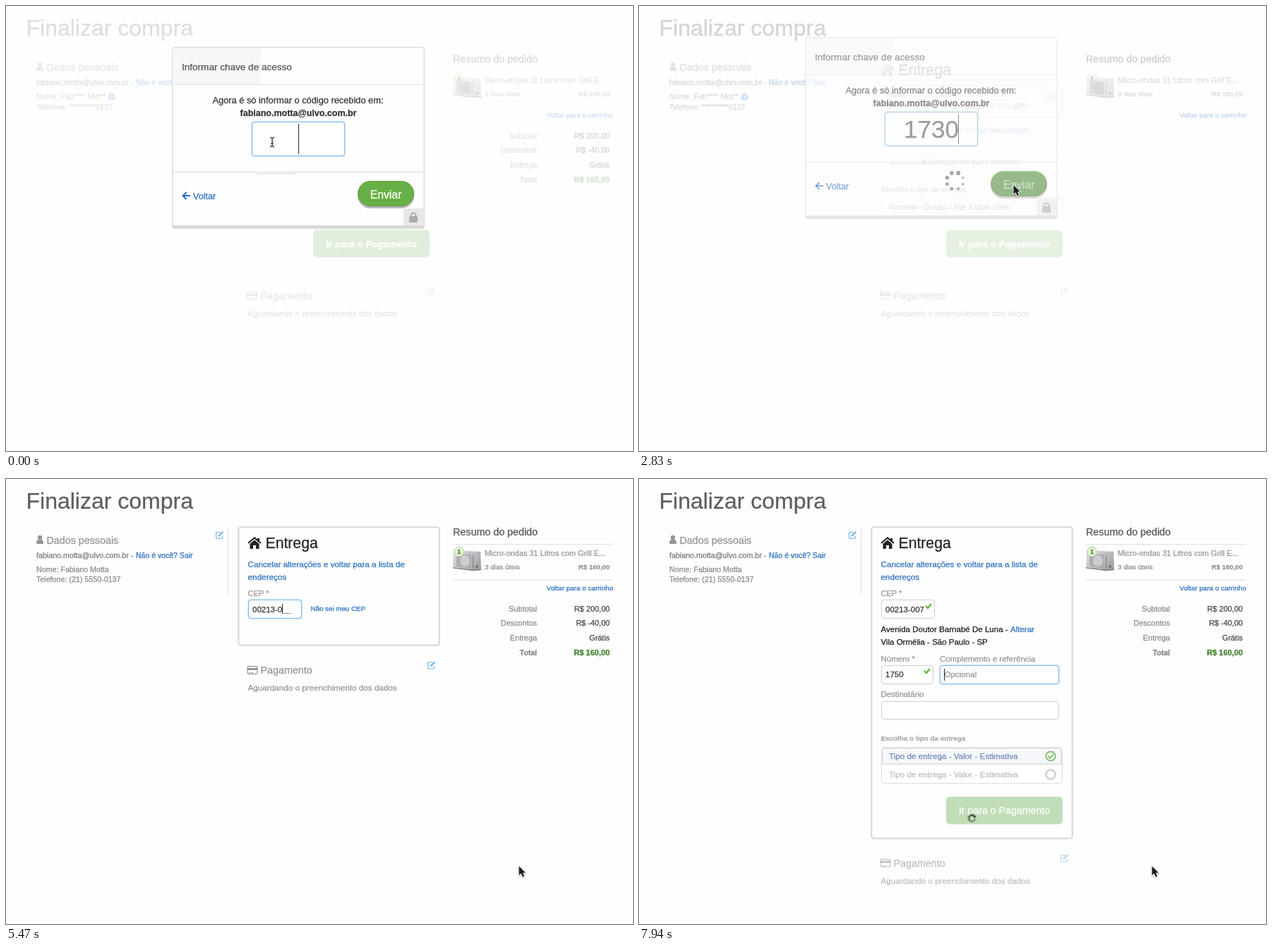
Write an HTML page with a canvas that moves like this. It is 888 px wide and 631 px high and loops after 8 s.

```html
<!DOCTYPE html>
<html lang="pt-BR">
<head>
<meta charset="utf-8">
<title>Finalizar compra</title>
<style>
html, body { margin: 0; width: 100%; height: 100%; overflow: hidden; background: #fefefe; }
canvas { display: block; width: 888px; height: 631px; }
</style>
</head>
<body>
<canvas id="stage" width="888" height="631"></canvas>
<script>
const c = document.getElementById('stage').getContext('2d');
const LOOP = 8000;
const FONT = '"Liberation Sans", Arial, sans-serif';
const MAIL = 'fabiano.motta@ulvo.com.br';
const CEP = '00213-007';
const BLUE = '#2a6fc0', GREEN = '#64aa4b', GRAY = '#949494', INK = '#333';

const clamp = v => Math.max(0, Math.min(1, v));
const ramp = (t, a, b) => clamp((t - a) / (b - a));
const ease = p => p * p * (3 - 2 * p);
const mix = (a, b, p) => a + (b - a) * p;

// y is the visual middle of the line; the hairline stroke gives smoothed weight
function text(s, x, y, size, color, align = 'left', weight = 400) {
  const base = Math.round(y + size * 0.35);
  c.font = `${weight} ${size}px ${FONT}`;
  c.textAlign = align;
  c.fillStyle = c.strokeStyle = color;
  c.lineWidth = 0.25;
  c.fillText(s, x, base);
  c.strokeText(s, x, base);
}
function bold(s, x, y, size, color, align) { text(s, x, y, size, color, align, 700); }

function faded(alpha, draw) {
  c.save();
  c.globalAlpha *= alpha;
  draw();
  c.restore();
}
function solid(draw) {
  c.save();
  c.globalAlpha = 1;
  draw();
  c.restore();
}
function box(x1, y1, x2, y2, r, fill, stroke, lw = 1) {
  const h = stroke ? lw / 2 : 0;
  c.beginPath();
  c.roundRect(x1 + h, y1 + h, x2 - x1 - 2 * h, y2 - y1 - 2 * h, r);
  if (fill) { c.fillStyle = fill; c.fill(); }
  if (stroke) { c.strokeStyle = stroke; c.lineWidth = lw; c.stroke(); }
}
function rect(x, y, w, h, color) { c.fillStyle = color; c.fillRect(x, y, w, h); }
function disc(x, y, r, color) {
  c.fillStyle = color;
  c.beginPath();
  c.arc(x, y, r, 0, 7);
  c.fill();
}
function ring(x, y, r, color, lw) {
  c.strokeStyle = color;
  c.lineWidth = lw;
  c.beginPath();
  c.arc(x, y, r, 0, 7);
  c.stroke();
}
function path(points, color, lw, close) {
  c.beginPath();
  points.forEach(([x, y]) => c.lineTo(x, y));
  if (close) c.closePath();
  if (lw) { c.strokeStyle = color; c.lineWidth = lw; c.stroke(); }
  else { c.fillStyle = color; c.fill(); }
}
function at(x, y, draw) {
  c.save();
  c.translate(x, y);
  draw();
  c.restore();
}
function field(x1, y1, x2, y2, glow = 0) {
  box(x1, y1, x2, y2, 3.5, '#fff', '#ccc');
  if (!glow) return;
  faded(glow, () => {
    box(x1 - 1.5, y1 - 1.5, x2 + 1.5, y2 + 1.5, 5, null, '#e0effb', 1.5);
    box(x1, y1, x2, y2, 3.5, null, '#7db8ea');
  });
}
function caret(x, y1, y2) { rect(x, y1, 1, y2 - y1, '#222'); }

const tick = (x, y, s, color, lw) =>
  path([[x - s, y], [x - s * 0.25, y + s * 0.75], [x + s, y - s * 0.75]], color, lw);

function checkCircle(x, y) {
  ring(x, y, 6.6, '#86c270', 2);
  tick(x, y, 3.6, '#86c270', 2);
}
function editIcon(x, y, color = '#6fb0e6') {
  at(x, y, () => {
    path([[1.5, -4], [-4, -4], [-5, -3], [-5, 4], [-4, 5], [3, 5], [4, 4], [4, 1.5]], color, 1.1);
    path([[-1.5, 1.5], [5, -4.5]], color, 2.2);
  });
}
function house(x, y, color) {
  at(x, y, () => {
    path([[-9, 0], [0, -7.5], [9, 0]], color, 2.2);
    rect(4, -7, 3, 5, color);
    path([[-6.5, 1], [0, -4.5], [6.5, 1], [6.5, 8], [2, 8], [2, 3], [-2, 3], [-2, 8], [-6.5, 8]], color, 0, true);
  });
}
function person(x, y) {
  disc(x, y - 3, 3.2, GRAY);
  box(x - 5, y, x + 5, y + 6, [4, 4, 1.5, 1.5], GRAY);
}
function card(x, y) {
  box(x - 7.5, y - 6, x + 7.5, y + 6, 1.5, null, GRAY, 1.2);
  rect(x - 7, y - 3, 14, 3, GRAY);
  rect(x - 5, y + 3, 2, 1, GRAY);
  rect(x - 2, y + 3, 3, 1, GRAY);
}

function dots(x, y, t) {
  const turn = Math.floor(t / 63) + 2;
  for (let i = 0; i < 8; i++) {
    const a = (turn - i) * Math.PI / 4 + Math.PI / 8;
    disc(x + Math.cos(a) * 12, y + Math.sin(a) * 12, 3.1 - i * 0.2, i < 5 ? '#777' : '#888');
  }
}
function blades(x, y, t) {
  const turn = Math.floor(t / 55);
  for (let i = 0; i < 12; i++) {
    const a = (i + turn) * Math.PI / 6, u = Math.cos(a), v = Math.sin(a);
    faded(0.3 + 0.7 * i / 11, () =>
      path([[x + u * 3, y + v * 3], [x + u * 6.3, y + v * 6.3]], '#111', 1.5));
  }
}

function arrow(x, y) {
  at(x, y, () => {
    c.shadowColor = 'rgba(0,0,0,.3)';
    c.shadowBlur = 2;
    c.shadowOffsetY = 1;
    const shape = [[0, 0], [0, 13], [3, 10.2], [5.3, 15.2], [7.6, 14.2], [5.4, 9.4], [9.3, 9.2]];
    path(shape, '#fff', 1.8, true);
    c.shadowColor = 'transparent';
    path(shape, '#1c1c1c', 0, true);
  });
}
function beam(x, y) {
  path([[x, y - 6], [x, y + 6]], '#222', 1.2);
  for (const s of [-1, 1])
    path([[x - 3, y + 7 * s], [x, y + 5.5 * s], [x + 3, y + 7 * s]], '#222', 1.2);
  path([[x - 2, y + 2], [x + 2, y + 2]], '#222', 1);
}

const TRACK = [
  [1730, 377, 193], [1950, 438, 226], [2350, 530.5, 254], [3540, 530.5, 254],
  [3800, 507, 219], [3930, 507, 219], [4200, 726.5, 549], [LOOP, 726.5, 549]
];
function pointer(t) {
  if (t < 1790) return beam(377, 193);
  const i = TRACK.findIndex(k => k[0] > t);
  const [a, b] = [TRACK[i - 1], TRACK[i]];
  const p = ease(ramp(t, a[0], b[0]));
  arrow(mix(a[1], b[1], p), mix(a[2], b[2], p));
}

function profile(masked, lines) {
  person(48, 86);
  text('Dados pessoais', 57.5, 86.5, 14.3, GRAY);
  editIcon(302.5, 79.5, masked ? '#aaa' : undefined);
  text(MAIL + ' - ', 43, 108.5, 10.7, '#777');
  text('Não é você? Sair', 184, 108.5, 10.5, BLUE);
  text('Nome: ' + (masked ? 'Fab**** Mot**' : 'Fabiano Motta'), 43, 128.5, 10.7, '#888');
  text('Telefone: ' + (masked ? '*********0137' : '(21) 5550-0137'), 43, masked ? 143 : 142, 10.7, '#888');
  if (masked) {
    disc(149.5, 129, 5, '#3d84d6');
    solid(() => bold('?', 149.5, 129, 8, '#fff', 'center'));
  }
  if (lines) rect(314, 70, 1, 93, '#ddd');
}

function oven() {
  const g = c.createLinearGradient(633, 100, 673, 130);
  g.addColorStop(0, '#dededf');
  g.addColorStop(0.6, '#bcbcc0');
  g.addColorStop(1, '#96969b');
  path([[634, 101], [672, 103], [673, 129], [661, 130], [633, 126]], g, 0, true);
  path([[638, 107], [659, 107], [659, 127], [638, 124]], '#adadb2', 0, true);
  c.fillStyle = '#cdcdd0';
  c.beginPath();
  c.ellipse(650, 116, 7, 8, 0, 0, 7);
  c.fill();
  rect(661, 108, 1, 19, '#777');
  disc(667, 124, 2, '#777');
  path([[633, 126], [661, 129.5], [673, 128.5]], '#666', 1.2);
}

function summary(totals, lines) {
  text('Resumo do pedido', 633, 75, 14.3, '#555');
  oven();
  disc(641.5, 103, 7, '#e4f1d6');
  ring(641.5, 103, 6.8, '#b5d7a0', 1);
  bold('1', 641.5, 103, 9, '#477a35', 'center');
  text('Micro-ondas 31 Litros com Grill E...', 678, 105, 10.95, GRAY);
  text('3 dias úteis', 678, 125, 9.8, '#888');
  bold('R$ 160,00', 855, 125, 9.6, GRAY, 'right');
  text('Voltar para o carrinho', 860, 155, 9.9, BLUE, 'right');
  if (lines) {
    rect(633, 92, 227, 1, '#ddd');
    rect(633, 143, 227, 1, '#ddd');
  }
  if (!totals) return;
  [['Subtotal', 'R$ 200,00'], ['Descontos', 'R$ -40,00'], ['Entrega', 'Grátis']].forEach(([k, v], i) => {
    text(k, 752, 184 + i * 20.5, 10.9, '#888', 'right');
    text(v, 855, 184 + i * 20.5, 10.9, '#444', 'right');
  });
  bold('Total', 752, 246, 10.6, '#888', 'right');
  bold('R$ 160,00', 855, 246, 11, '#417f2d', 'right');
}

function payButton(y, alpha, weight) {
  faded(alpha, () => box(435, y, 600, y + 39, 5, GREEN));
  solid(() =>
    text('Ir para o Pagamento', 517.5, y + 19.5, weight > 400 ? 13.4 : 14.2, '#fff', 'center', weight));
}

function payment(y, hover) {
  if (hover) {
    box(328, y - 19, 615, y + 49, 4, '#fefefe', '#eee', 2);
    rect(591, y - 17, 22, 22, '#f1f1f1');
  }
  card(349, y);
  text('Pagamento', 360.5, y, 14.3, GRAY);
  text('Aguardando o preenchimento dos dados', 342.5, y + 25, 11.7, GRAY);
  editIcon(602.5, y - 7);
}

function heading() {
  house(352, 91, '#222');
  text('Entrega', 367.5, 91, 21.2, '#222');
}

function smudge(x, y, w) {
  for (let i = 0; i < w; i += 6) rect(x + i, y - 4, 5, 8, i % 12 ? '#ddd' : '#ccc');
}

function addressList(button) {
  heading();
  box(343, 112, 600, 158, 4, null, '#ccc');
  text('Rua', 351, 125, 11, '#557');
  smudge(371, 125, 56);
  text('edo,', 428, 125, 11, '#557');
  smudge(452, 125, 18);
  text(',', 471, 125, 11, '#557');
  smudge(477, 125, 45);
  text('Rio', 351, 142, 11, '#557');
  smudge(370, 142, 58);
  text('- RJ - Brasil -', 431, 142, 11, '#557');
  smudge(497, 142, 29);
  text('-070', 527, 142, 11, '#557');
  checkCircle(583, 129.5);
  c.setLineDash([3, 3]);
  box(343, 164, 600, 189, 3, null, '#ddd');
  box(343, 209, 600, 234, 3, null, '#ddd');
  c.setLineDash([]);
  editIcon(395, 177, '#5a8fd0');
  text('Modificar endereço selecionado', 403, 176.5, 10.6, '#5a8fd0');
  rect(400, 219.5, 8, 2.5, '#5a8fd0');
  rect(402.8, 216.8, 2.5, 8, '#5a8fd0');
  text('Entregar em outro endereço', 410.5, 221, 10.5, '#5a8fd0');
  bold('Escolha o tipo da entrega', 343, 259.5, 9.86, '#888');
  box(343, 272, 600, 298, 4, null, '#ccc');
  text('Normal - Grátis - Até 3 dias úteis', 354.5, 285, 11.8, '#557');
  checkCircle(583, 285);
  payButton(317.5, button, 700);
}

function cepField(t) {
  const done = t >= 5990;
  field(343, 171, 419, 198, done ? 0 : 1);
  let n = 0;
  [[4180, 1], [4670, 4], [5070, 6], [5470, 7], [5670, 8], [5870, 9]].forEach(([when, k]) => {
    if (t >= when) n = k;
  });
  const typed = CEP.slice(0, n);
  text(typed, 349, 184.5, 11.5, INK);
  const w = c.measureText(typed).width;
  text('_____-___'.slice(n), 349 + w, 184.5, 11.5, '#888');
  const off = (t >= 4870 && t < 5070) || (t >= 5270 && t < 5470);
  if (!done && !off) caret(Math.round(348.5 + w), 177, 191);
  if (t >= 6220) tick(410, 180, 4, '#5cb040', 2.2);
  else if (!done) text('Não sei meu CEP', 431.5, 184, 9.75, BLUE);
}

function fullForm(t) {
  const shown = mix(0.25, 1, ramp(t, 6220, 6740));
  const next = ramp(t, 7780, 7900);
  faded(shown, () => {
    text('Avenida Doutor Barnabé De Luna -', 342.5, 213, 11.55, '#1c1c1c');
    text('Alterar', 526, 213, 11.5, BLUE);
    text('Vila Ormélia - São Paulo - SP', 342.5, 230.5, 11.5, '#1c1c1c');
    text('Número *', 342.5, 255, 11.5, GRAY);
    text('Complemento e referência', 426, 255, 11.5, GRAY);
    text('Destinatário', 342.5, 305.5, 11.4, GRAY);
    field(426, 264, 595, 291, next);
    text('Opcional', 432.5, 277, 11.6, GRAY);
    field(343, 315, 595, 341);
    bold('Escolha o tipo da entrega', 342.5, 367.5, 9.86, '#aaa');
    box(343, 380, 600, 432, 4, '#fff', '#ddd');
    box(344, 381, 599, 405, 2, '#f5f7fb', '#ddd', 1.5);
    text('Tipo de entrega - Valor - Estimativa', 354, 393, 11.7, '#7089b5');
    text('Tipo de entrega - Valor - Estimativa', 354, 418.5, 11.7, '#bbb');
    checkCircle(583, 393);
    ring(583, 419, 6.6, '#ccc', 2.3);
  });
  field(343, 264, 417, 291, 1 - next);
  const n = t < 7030 ? 0 : Math.min(4, 1 + Math.floor((t - 7030) / 170));
  text('1750'.slice(0, n), 349, 277, 11.5, INK);
  const w = c.measureText('1750'.slice(0, n)).width;
  if (next > 0.4) {
    tick(408, 272, 4, '#5cb040', 2.2);
    caret(432, 269, 286);
  } else caret(Math.round(348.5 + w), 269, 285);
  payButton(450.5, mix(0.46, 0.4, ramp(t, 6460, 6970)), 400);
  faded(shown, () => blades(471.5, 481, t));
}

function addressForm(t) {
  const full = t >= 6220;
  const bottom = full ? 511 : t < 3980 ? 219 : 237;
  const payY = full ? 544.5 : t < 3980 ? 253 : 271;
  const dim = full ? mix(1, 0.55, ramp(t, 6500, 6970)) : t >= 5870 ? 0.7 : 1;
  box(328, 67, 615, bottom, 4, '#fefefe', '#ddd', 2.5);
  heading();
  text('Cancelar alterações e voltar para a lista de', 342.5, 120.5, 11.7, BLUE);
  text('endereços', 342.5, 138.5, 11.7, BLUE);
  text('CEP *', 342.5, 162, 11, GRAY);
  cepField(t);
  if (full) fullForm(t);
  faded(dim, () => payment(payY, t < 3980));
}

function lockTab() {
  box(563, 287, 592, 311, [4, 0, 0, 0], '#e8e8e8');
  box(571, 298, 583, 307, 1.5, '#adadad');
  c.strokeStyle = '#adadad';
  c.lineWidth = 2;
  c.beginPath();
  c.arc(577, 297, 3.4, Math.PI, 0);
  c.lineTo(580.4, 299);
  c.moveTo(573.6, 297);
  c.lineTo(573.6, 299);
  c.stroke();
}

function modal(t) {
  box(236, 59, 592, 311, 3, '#fefefe');
  box(235, 58, 593, 315, 4, null, '#dcdcdc', 1.5);
  box(235, 311, 593, 316, [0, 0, 4, 4], '#d8d8d8');
  rect(236, 60, 125, 51, '#f7f7f7');
  rect(236, 111, 356, 1, '#e4e4e4');
  rect(236, 235, 356, 1, '#d8d8d8');
  rect(355, 237, 56, 2, '#e9e9e9');
  text('Informar chave de acesso', 249, 86, 13.55, '#555');
  text('Agora é só informar o código recebido em:', 413.5, 134, 12.8, INK, 'center');
  bold(MAIL, 414, 152, 12.5, INK, 'center');
  field(348, 164, 480, 213, 1);
  const code = '1730'.slice(0, [300, 890, 1310, 1730].filter(k => t >= k).length);
  text(code, 414, 188.5, 35, '#4a4a4a', 'center');
  caret(Math.round(413.5 + c.measureText(code).width / 2), 167, 210);
  path([[261, 269], [250.5, 269]], BLUE, 2);
  path([[255.5, 264], [250.5, 269], [255.5, 274]], BLUE, 2);
  text('Voltar', 265, 270, 12.6, BLUE);
  box(498, 250, 578, 287, 18, '#b9b9b9');
  box(498, 248, 578, 284, 18, t > 2260 ? '#5a9c40' : '#67b045', '#589a3c');
  text('Enviar', 538, 267.5, 15.7, '#fff', 'center');
  lockTab();
}

function draw(t) {
  c.globalAlpha = 1;
  rect(0, 0, 888, 631, '#fefefe');
  const open = t < 2710, loading = t < 3520, list = t < 3860;
  const base = open ? 0.19 : loading ? mix(0.19, 0.31, ramp(t, 2710, 2950)) : mix(0.31, 1, ramp(t, 3520, 3680));
  faded(base, () => {
    text('Finalizar compra', 28.5, 30.5, 32, '#5e5e5e');
    profile(loading, !loading);
    summary(open || !loading, !loading);
    if (open) payButton(317.5, 1, 700);
    else if (list) addressList(loading ? 0.63 : 1);
    if (list) faded(!open && loading ? 0.75 : 1, () => payment(411, false));
  });
  if (!list) addressForm(t);
  const out = ramp(t, 2710, 2960);
  if (out < 1) faded(1 - out, () => at(0, -29 * out, () => modal(t)));
  if (!open && loading) faded(ramp(t, 2710, 2900), () => dots(447.5, 248, t));
  pointer(t);
}

function frame(now) {
  draw(now % LOOP);
  requestAnimationFrame(frame);
}
requestAnimationFrame(frame);
</script>
</body>
</html>
```
